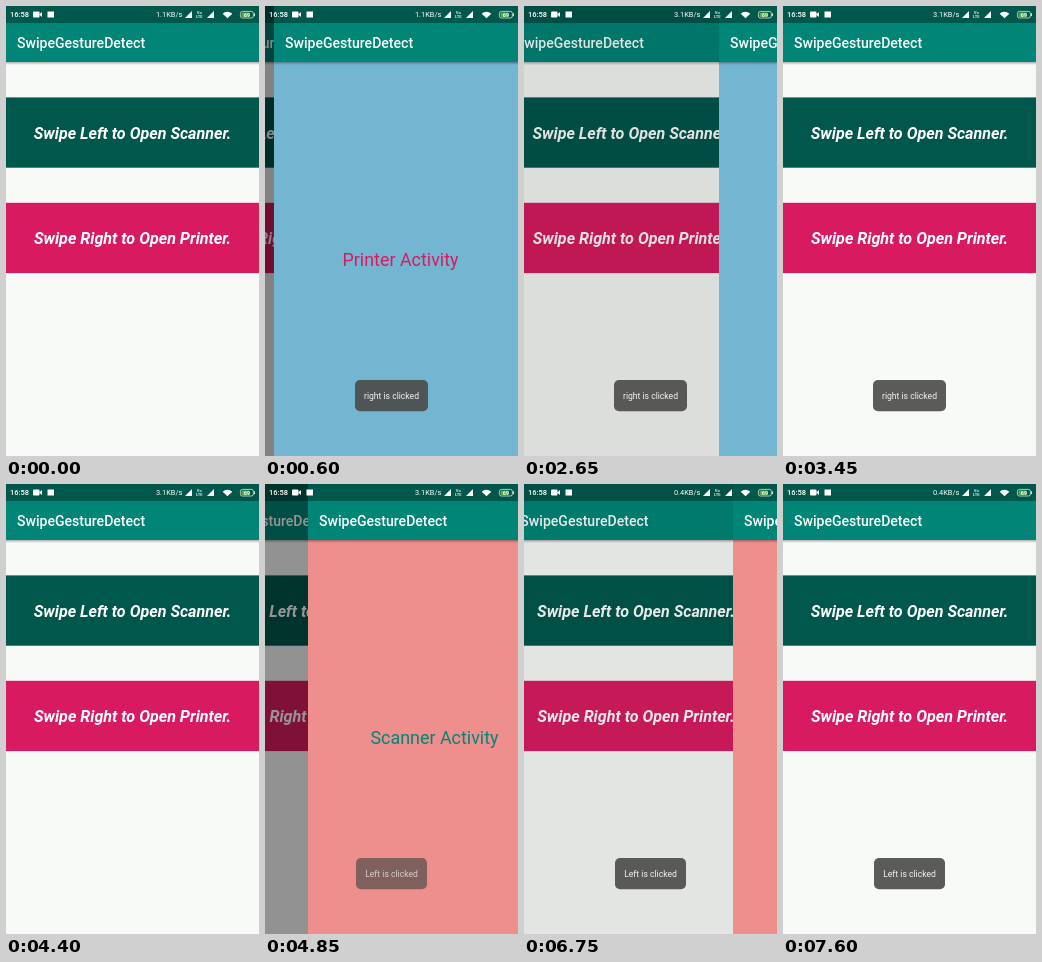
Animation, 253 px wide and 450 px high, one loop 7.65 s. Source, as an HTML page with a canvas:

```html
<!DOCTYPE html>
<html lang="en">
<head>
<meta charset="utf-8">
<title>Swipe gestures</title>
<style>
html, body { margin: 0; width: 100%; height: 100%; overflow: hidden; background: #f8faf8; }
canvas { display: block; width: 253px; height: 450px; }
</style>
</head>
<body>
<canvas id="stage"></canvas>
<script>
const W = 253, H = 450, LOOP = 7650, STEP = 50, SLIDE = 450;
const BAR = 17, HEAD = 56;
const canvas = document.getElementById('stage');
const ctx = canvas.getContext('2d');
const dpr = window.devicePixelRatio || 1;
canvas.width = W * dpr;
canvas.height = H * dpr;

const visits = [
  { label: 'Printer Activity', bg: '#74b5d1', ink: '#d81b60', open: 300, close: 2475,
    toast: 'right is clicked', toastW: 73, toastIn: 350, toastOut: 3800 },
  { label: 'Scanner Activity', bg: '#ef8f8d', ink: '#008577', open: 4650, close: 6551,
    toast: 'Left is clicked', toastW: 71, toastIn: 4700, toastOut: 8150 }
];

const clamp = v => Math.max(0, Math.min(1, v));
const easeOut = v => 1 - (1 - clamp(v)) ** 3;

function rect(x, y, w, h, fill) {
  ctx.fillStyle = fill;
  ctx.fillRect(x, y, w, h);
}

function round(x, y, w, h, r, fill) {
  ctx.fillStyle = fill;
  ctx.beginPath();
  ctx.roundRect(x, y, w, h, r);
  ctx.fill();
}

function poly(fill, ...pts) {
  ctx.fillStyle = fill;
  ctx.beginPath();
  for (const [x, y] of pts) ctx.lineTo(x, y);
  ctx.fill();
}

function text(str, x, y, font, fill, align = 'left') {
  ctx.font = font + ' Roboto, sans-serif';
  ctx.fillStyle = fill;
  ctx.textAlign = align;
  ctx.fillText(str, x, y);
}

function header() {
  const shade = ctx.createLinearGradient(0, HEAD, 0, HEAD + 3);
  shade.addColorStop(0, 'rgba(0,0,0,.3)');
  shade.addColorStop(1, 'rgba(0,0,0,0)');
  rect(0, HEAD, W, 3, shade);
  rect(0, 0, W, BAR, '#00574b');
  rect(0, BAR, W, HEAD - BAR, '#008577');
  text('SwipeGestureDetect', 11, 42, '500 14.06px', '#fff');
}

function button(y, color, label) {
  rect(0, y, W, 70.3, color);
  text(label, W / 2, y + 41.5, 'italic 700 16.1px', '#fff', 'center');
}

function home() {
  rect(0, 0, W, H, '#f8faf8');
  header();
  button(91.4, '#00574b', 'Swipe Left to Open Scanner.');
  button(196.8, '#d81b60', 'Swipe Right to Open Printer.');
}

function activity(v) {
  rect(0, 0, W, H, v.bg);
  header();
  text(v.label, W / 2, 260.3, '400 17.9px', v.ink, 'center');
}

function at(x, draw) {
  ctx.save();
  ctx.translate(x, 0);
  draw();
  ctx.restore();
}

function signal(x) {
  poly('#fff', [x, 12], [x + 7, 12], [x + 7, 5]);
}

function statusIcons(t) {
  const white = '#fff';
  text('16:58', 4, 11.4, '500 7.5px', white);
  round(27, 5.5, 6.5, 6, 1, white);
  poly(white, [33, 8.5], [36, 6], [36, 11]);
  rect(41.5, 5.5, 6.5, 6, white);
  const speed = t < 2100 ? '1.1' : t < 6100 ? '3.1' : '0.4';
  text(speed + 'KB/s', 176.3, 11.4, '400 7.4px', white, 'right');
  signal(179);
  text('Vo', 193.3, 8, '500 4.2px', white, 'center');
  text('LTE', 193.3, 12, '500 4.2px', white, 'center');
  signal(201);
  ctx.fillStyle = white;
  ctx.beginPath();
  ctx.moveTo(221.5, 12.3);
  ctx.arc(221.5, 12.3, 6.6, -Math.PI * .76, -Math.PI * .24);
  ctx.fill();
  ctx.strokeStyle = '#d5e8d5';
  ctx.lineWidth = .8;
  ctx.beginPath();
  ctx.roundRect(234.4, 5.4, 13, 6.6, 2);
  ctx.stroke();
  round(235.6, 6.5, 8, 4.4, 1, '#5fae4c');
  rect(248, 7.3, 1, 2.8, '#d5e8d5');
  text('69', 241, 11, '500 5.5px', white, 'center');
}

function toast(v, t) {
  const alpha = clamp((t - v.toastIn) / 200) * clamp((v.toastOut + 200 - t) / 200);
  if (!alpha) return;
  ctx.globalAlpha = alpha;
  round(126.5 - v.toastW / 2, 374, v.toastW, 31.3, 5, 'rgba(75,75,72,.9)');
  text(v.toast, 126.5, 392.8, '400 8.6px', '#f4f4f4', 'center');
  ctx.globalAlpha = 1;
}

function render(t) {
  ctx.setTransform(dpr, 0, 0, dpr, 0, 0);
  const v = visits.find(a => t >= a.open && t < a.close + SLIDE);
  const cover = v ? easeOut((t - v.open) / SLIDE) - easeOut((t - v.close) / SLIDE) : 0;
  if (cover < 1) at(-cover * W / 3, home);
  if (cover > 0) {
    rect(0, 0, W, H, `rgba(0,0,0,${cover * .5})`);
    at(Math.round(W * (1 - cover)), () => activity(v));
  }
  statusIcons(t);
  visits.forEach(a => toast(a, t));
}

const start = performance.now();
function tick() {
  const t = (performance.now() - start) % LOOP;
  render(Math.floor(t / STEP) * STEP);
  requestAnimationFrame(tick);
}
tick();
</script>
</body>
</html>
```
